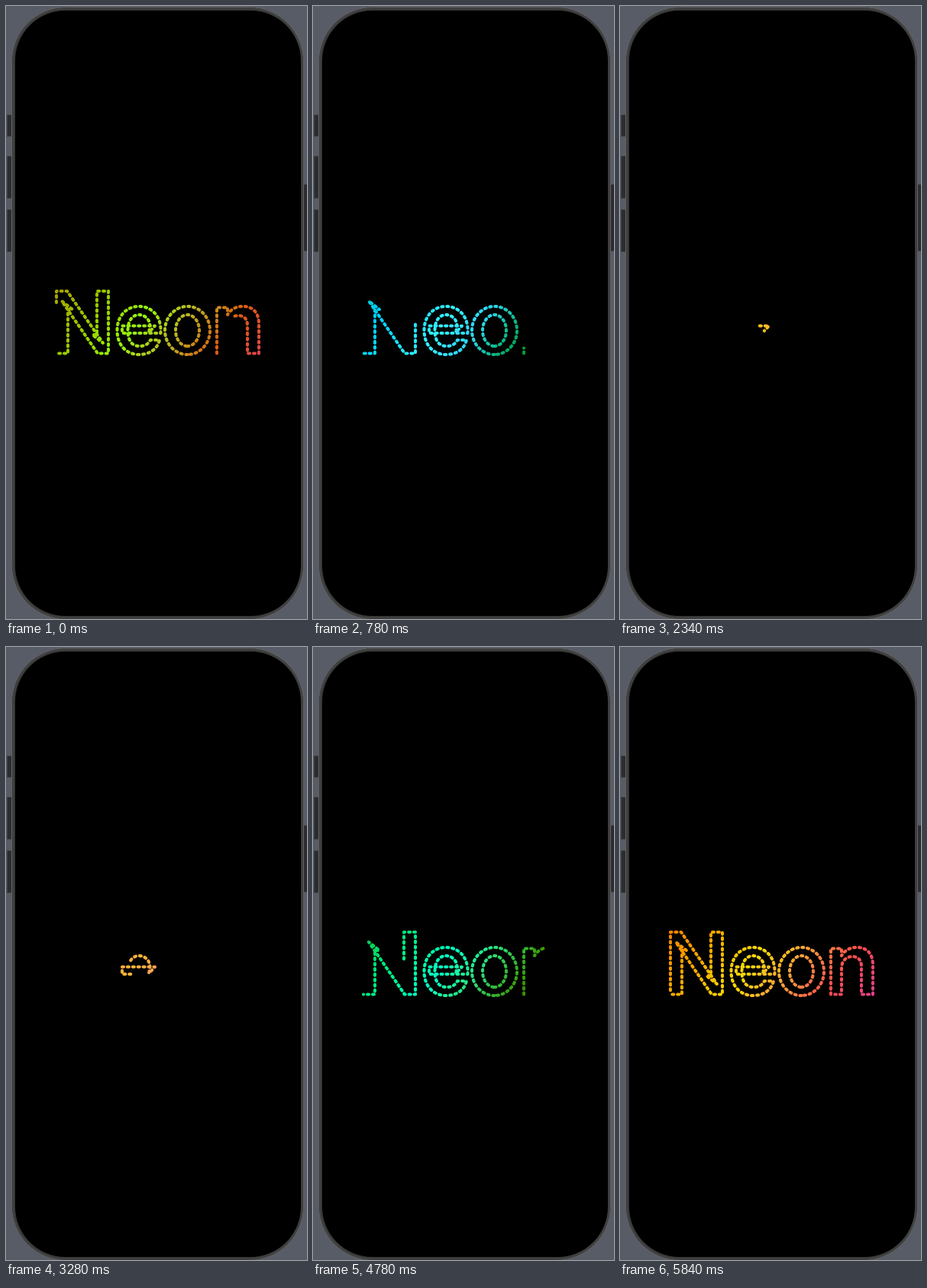
An HTML page that plays this animation: 394x802 px, repeating every 5.86 s.

```html
<!DOCTYPE html>
<html lang="en">
<head>
<meta charset="utf-8">
<title>Neon</title>
<style>
  html, body { margin: 0; width: 100%; height: 100%; overflow: hidden; background: #575c66; }
  svg { display: block; width: 394px; height: 802px; }
  .button { fill: #2b2c2f; stroke: #414349; }
  #neon {
    fill: none; stroke: url(#glow); stroke-width: 4.1;
    stroke-linecap: round; stroke-linejoin: round; stroke-dasharray: 2 4.9;
  }
</style>
</head>
<body>
<svg viewBox="0 0 394 802" role="img" aria-label="Neon">
  <defs>
    <linearGradient id="glow" gradientUnits="userSpaceOnUse" x1="66" y1="373" x2="282" y2="524">
      <stop offset="0" stop-color="#ff8400"/>
      <stop offset=".2" stop-color="#ffa800"/>
      <stop offset=".42" stop-color="#ffd60a"/>
      <stop offset=".6" stop-color="#ffa03c"/>
      <stop offset=".82" stop-color="#ff4a55"/>
      <stop offset="1" stop-color="#e0408a"/>
    </linearGradient>
  </defs>

  <rect class="button" x="1.5" y="142.5" width="6" height="28"/>
  <rect class="button" x="1.5" y="196.5" width="6" height="55"/>
  <rect class="button" x="1.5" y="266.5" width="6" height="55"/>
  <rect class="button" x="389.5" y="233.5" width="6" height="87"/>
  <rect x="7.5" y="1.5" width="382" height="801" rx="71" fill="#353535" stroke="#626262"/>
  <rect x="9.5" y="3.5" width="378" height="797" rx="69" fill="none" stroke="#424242" stroke-width="2"/>
  <rect x="12" y="6" width="374" height="792" rx="66" fill="#000"/>

  <path id="neon"/>
</svg>

<script>
const LOOP = 5860, TURN = 2610, SHRINK = 3270, GROW = 3430, STEP = 0.5;

// Letter outlines in drawing order, all clockwise except the inside of the o.
const outlines = [
  "M66 454.5V373H80L127 441L113 430H119V373H134V454.5H120L73 386L87 397H81V454.5Z",
  "M174 456C158 456 145.5 444 145.5 424.5C145.5 405 158 393 174 393" +
    "C190 393 202.5 405 202.5 424V428H152V418.5H195L187 427L188.5 418" +
    "C188 410 182 404 174 404C166 404 159.5 411 159.5 424.5" +
    "C159.5 438 165 445 175 445C182 445 186.5 442 189 437H201C198 449 188 456 174 456Z",
  "M237.5 456A29.5 31.5 0 0 1 237.5 393A29.5 31.5 0 0 1 237.5 456Z",
  "M237.5 445A15.5 20.5 0 0 0 237.5 404A15.5 20.5 0 0 0 237.5 445Z",
  "M276 454.5V394.5H290V404C294 397 301 393 310 393C323 393 331 401 331 416" +
    "V454.5H316V418C316 410 312 405 304 405C296 405 290 411 290 420V454.5Z"
];

let total = 0;
const contours = outlines.map(d => {
  const path = document.createElementNS("http://www.w3.org/2000/svg", "path");
  path.setAttribute("d", d);
  const length = path.getTotalLength(), start = total, points = [];
  for (let s = 0; s < length; s += STEP) points.push(pointAt(path, s));
  total += length;
  return { path, length, start, points };
});

function pointAt(path, s) {
  const p = path.getPointAtLength(s);
  return p.x.toFixed(2) + " " + p.y.toFixed(2);
}

function trim(from, to) {
  return contours.map(({ path, length, start, points }) => {
    const a = Math.max(0, from - start), b = Math.min(length, to - start);
    if (b - a < 0.05) return "";
    const inner = points.slice(Math.floor(a / STEP) + 1, Math.ceil(b / STEP));
    return "M" + [pointAt(path, a), ...inner, pointAt(path, b)].join("L");
  }).join("");
}

// cubic-bezier(.42, 0, .58, 1)
function easeInOut(x) {
  let lo = 0, hi = 1;
  for (let i = 0; i < 30; i++) {
    const u = (lo + hi) / 2, v = 1 - u;
    if (1.26 * v * v * u + 1.74 * v * u * u + u * u * u < x) lo = u; else hi = u;
  }
  return lo * lo * (3 - 2 * lo);
}

const neon = document.getElementById("neon");

function draw() {
  const t = performance.now() % LOOP;
  const x = 1 - Math.abs(t - TURN) / (t < TURN ? SHRINK : GROW);
  const p = easeInOut(Math.max(0, x));
  neon.setAttribute("d", trim(total * p / 2, total * (1 - p / 2)));
  neon.style.filter = `hue-rotate(${(360 * p).toFixed(2)}deg)`;
  requestAnimationFrame(draw);
}
draw();
</script>
</body>
</html>
```
